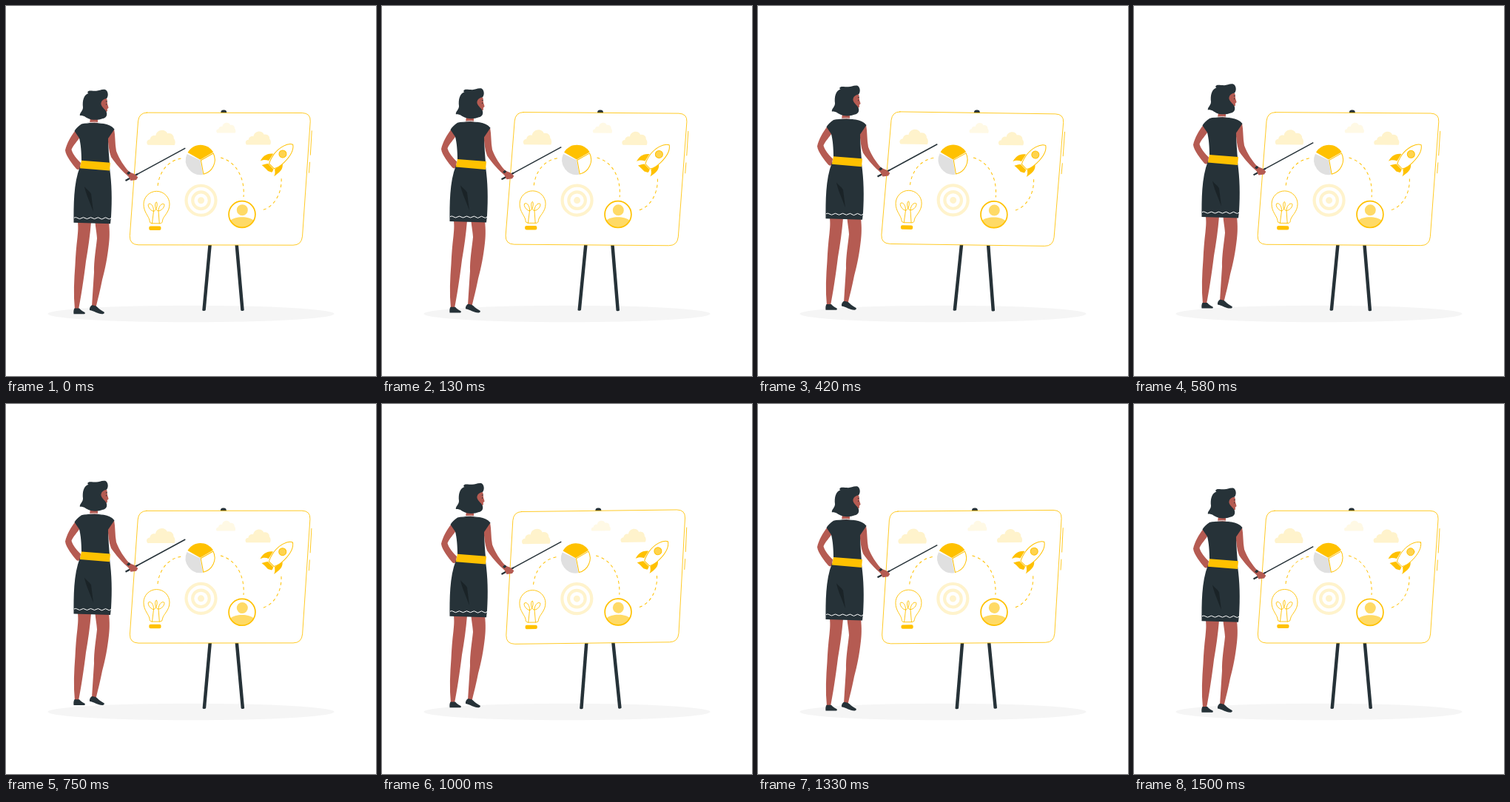
Recreate the animation shown at these times as an HTML page. Size 500 by 500 pixels, loop 1.54 s.

```html
<!DOCTYPE html>
<html lang="en">
<head>
<meta charset="utf-8">
<title>Presentation</title>
<style>
  @property --p { syntax: "<number>"; inherits: true; initial-value: 0; }
  html, body { margin: 0; width: 100%; height: 100%; overflow: hidden; background: #fff; }
  svg {
    display: block; width: 100%; height: 100%;
    animation: phase 1540ms steps(37, start) -4ms infinite;
  }
  @keyframes phase { from { --p: 0; } to { --p: 1; } }

  /* Triangle waves driven by the shared phase */
  .board {
    transform-origin: 290px 276px;
    transform: rotate(calc(1deg * max(min(4 * var(--p), 2 - 4 * var(--p)), 4 * var(--p) - 4)));
  }
  .woman { transform: translateY(calc(.5px - 20px * min(var(--p), 1 - var(--p)))); }

  .dark { fill: #263238; }
  .gold { fill: #ffc100; }
  .mid { fill: #ffda66; }
  .pale { fill: #fff3cc; }
  .skin { fill: #b55b52; }
  .line { fill: none; stroke: #ffc100; stroke-linecap: round; stroke-linejoin: round; }
  .dash { stroke-dasharray: 4 4; stroke-linecap: butt; }
  .ring { fill: none; stroke: #fff3cc; stroke-width: 4.2; }
  .blank { fill: #fff; }
</style>
</head>
<body>
<svg viewBox="0 0 500 500">
  <defs>
    <path id="cloud" d="M1.500 21C-1 18 0 14 4.500 13.500C5 9 9 7.500 12 8.500C13 0 25-2 28 5.500C33 4 37 8 36.500 12C39 14.500 39 19 37.500 21Z"/>
  </defs>

  <ellipse cx="250" cy="416" rx="193.500" ry="11.300" fill="#f5f5f5"/>

  <g class="board">
    <g class="dark">
      <path d="M273.500 322H278L270 411Q269.500 412 267.500 412T265.500 411Z"/>
      <path d="M309.500 322H314L322 411Q321.500 412 319.500 412T317.500 411Z"/>
      <path d="M290 145C290 141.500 291 140.500 294 140.500S298 141.500 298 145Z"/>
    </g>
    <path class="line blank" stroke-width=".85" d="M190 144.300H400Q411.500 144.500 411 155.500L400.600 311Q399.500 323 388 323H179Q167 322.700 167.400 311L178.300 156Q179.500 144.500 190 144.300Z"/>
    <path class="line" stroke-width=".85" d="M413 168.500L411.200 201M410.400 211L409.400 225"/>

    <g class="pale">
      <use href="#cloud" x="190" y="167"/>
      <use href="#cloud" transform="translate(323.500 168.700) scale(.89)"/>
      <use href="#cloud" transform="translate(284 157.200) scale(.68)" opacity=".5"/>
    </g>

    <g class="line dash">
      <path d="M205 243C207 225 218 209 237 206"/>
      <path d="M290 205C310 210 323 231 321 258"/>
      <path d="M372 233C373 252 363 271 347 275.500"/>
    </g>

    <!-- Pie chart -->
    <path fill="#e0e0e0" d="M262.500 208.500L244.500 200A20 20 0 0 0 266 228Z"/>
    <path class="gold" d="M262.500 207.800L245.500 198A20 20 0 0 1 280 197.500Z"/>
    <path class="line blank" d="M263.300 208.500L280 199A20 20 0 0 1 266.800 227.300Z"/>

    <!-- Target -->
    <circle class="ring" cx="263.500" cy="262.800" r="20"/>
    <circle class="ring" cx="263.500" cy="262.800" r="11.300"/>
    <circle class="pale" cx="263.500" cy="262.800" r="4.500"/>

    <!-- Profile -->
    <g class="mid">
      <circle cx="319.300" cy="275.600" r="7.500"/>
      <path d="M303 290C309 283.500 329 283.500 335 290A17.900 17.900 0 0 1 303 290Z"/>
    </g>
    <circle class="line" cx="319" cy="281.400" r="17.900" stroke-width="1.700"/>

    <!-- Bulb -->
    <g class="line" stroke-width=".9">
      <path d="M197 294Q194 294 194 290C193 284 186 279 186 268A17.500 17.500 0 0 1 221 268C221 279 212.500 284 211.500 290Q211.500 294 208.500 294Z"/>
      <path d="M197.500 294L199.500 277.500C195 277 190.500 270 192.800 267.700C196.500 266 200 272 199.500 277.500"/>
      <path d="M199.500 277.500C203.500 277.500 205.500 267 203.300 265C200.500 266 201 277 206 277C210.500 277 215 271 213.700 268C210.500 266 206 271 206 277L207.300 294"/>
    </g>
    <rect class="gold" x="193.300" y="297.700" width="16.200" height="5.400" rx="2"/>

    <!-- Rocket -->
    <g class="gold">
      <path d="M343.500 209.500C347 203 352 198.500 361 199.500L355 209C351 207.500 347 207.500 343.500 209.500Z"/>
      <path d="M362 230C364 227 363.500 223 363 220.500L373.500 212.500C375 221 369 225 362 230Z"/>
      <path d="M354 213L361.500 220.500C360.500 222 360.500 223.500 359 224.500L354 223C351 220 348.500 217 345.500 215L351 213.500Z"/>
    </g>
    <path class="line blank" d="M387.500 187C380 184.500 369 191 362 200C358 206 356 210 355.500 213L362 219.500C366 219 371 216 376 211C384 203 389 194 387.500 187Z"/>
    <circle class="line" style="fill:#ffd34d" cx="373.800" cy="199.800" r="5"/>
  </g>

  <g class="woman">
    <g class="skin">
      <path d="M97 292H115C113.500 310 111 328 108 345C105 370 101 395 98 410H93C91 390 92 370 93.500 350C94 338 95 325 96.500 313C97.300 305 97.800 300 97 292Z"/>
      <path d="M120.500 292H139C140.300 305 140 314 139 322C137 340 134 355 130 370C127 385 124 397 121.500 407L116 406C117 390 118 375 119 360C118.500 345 122 325 123 314C122.500 305 121 300 120.500 292Z"/>
      <path d="M94 168C88 175 82 186 80 195C81 203 90 214 95 220C97 222 99 221 100 219L101 212C96 207 90 200 88.500 194C91 188 97 182 100 177Z"/>
      <path d="M114 150H124V159H113Z"/>
    </g>
    <g class="dark">
      <path d="M92.500 408.500H99C101 411 104 413 106.500 414Q107.500 416 106 416.200H91.500C91 413 91.500 410 92.500 408.500Z"/>
      <path d="M116 404.300C119 404.500 122 405 123.500 407C126 410 130 412 132.500 413.500C133.500 415 132 416.200 130 416.200C124 416 119 412 113 411C112.500 408 114 406 116 404.300Z"/>
    </g>

    <!-- Pointer and arm -->
    <path fill="none" stroke="#263238" stroke-width="1.500" d="M164 234.700L242.300 192.200"/>
    <path fill="none" stroke="#263238" stroke-width="2.200" d="M161.500 236L178 227.100"/>
    <path class="skin" d="M137.500 176L146 166C148 176 147 186 149 196C153 207 160 217 166 223.500C169 226 173 226 175.500 228.500L178.300 231.500L176 235L168.500 236L165.500 230.500C158 224 148 213 142 204C139 196 138 186 137.500 176Z"/>
    <path class="dark" d="M163 226L166 223.300L168.500 225.500L165.500 228Z"/>

    <!-- Dress -->
    <path class="dark" d="M102 159.500C97 163 94 166 92.500 169L99 178.500C101 186 102 198 102 210L140 213C139 200 138 187 138 179L146.500 166.500C143 162 138 160 132 159C122 157.500 110 157.500 102 159.500Z"/>
    <path fill="none" stroke="#e3e7e9" d="M109 157.800Q120 156.300 130 158.100"/>
    <path class="dark" d="M100 217L140 219C143 240 143.500 262 142 285L141 294.200L91.500 292.700C91.500 270 91 240 100 217Z"/>
    <path fill="#1a2327" d="M106 244C110 249 114 251 115 254L118 278C112 262 108 254 106 244Z"/>
    <path fill="none" stroke="#fff" d="M92 286.200Q94.500 284.700 97 286.700T102 286.700T107 286.700T112 286.700T117 286.700T122 286.700T127 287T132 287T137 287T142 286.700"/>
    <path class="gold" d="M102 208.700L141 211.700L140 222.600L99.800 219.200Z"/>

    <!-- Head -->
    <path class="skin" d="M133 123L136.500 126L137 132L138.600 137.500L136.800 139.300L137 142L134 144L127 141V130Z"/>
    <path class="dark" d="M110.300 116.300C111 113.300 116 114.800 122 114.800C126 114.800 129 112.300 134 113C138 114.800 139 121 136 125C131 125.500 128 129 128.500 133C130 138 135 140 136 144C137 148 135 151.500 131 152C125 154.500 116 154.500 111 152C107 150 105 147.500 99.800 148C99.500 144 104 142 104 137C103 128 105 120 111.500 118Q110 118 110.300 116.300Z"/>
    <path fill="none" stroke="#263238" stroke-width=".9" d="M134.800 129.300L136.800 128.800M135.500 132.300V133.800"/>
  </g>
</svg>
</body>
</html>
```
